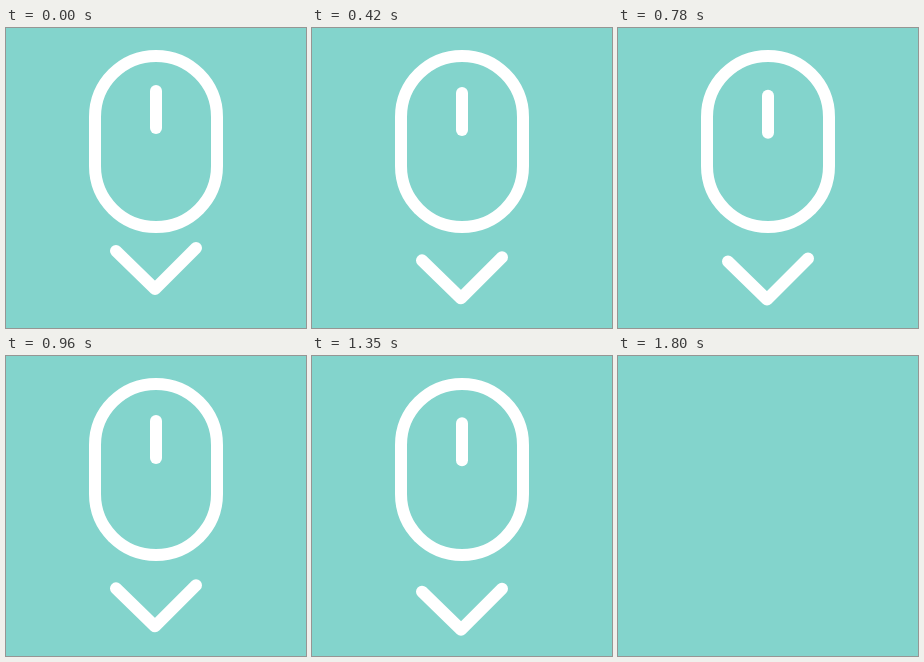
Write an HTML page that moves like this. It is 300 px wide and 300 px high and loops after 1.83 s.

```html
<!DOCTYPE html>
<html lang="en">
<head>
<meta charset="utf-8">
<title>Scroll hint</title>
<style>
  html, body { margin: 0; width: 100%; height: 100%; overflow: hidden; background: #83d4cc; }
  svg { display: block; width: 100%; height: 100%; }
</style>
</head>
<body>
<svg viewBox="0 0 300 300">
  <g id="icon" fill="none" stroke="#fff" stroke-width="12" stroke-linecap="round" stroke-linejoin="round">
    <rect x="89" y="28" width="122" height="171" rx="61"/>
    <path id="wheel" d="M150 63V100"/>
    <path id="arrow" d="M110 223L149 261L190 220"/>
  </g>
</svg>
<script>
  const LOOP = 1830, STEP = 30, CYCLE = 540, PEAK = 225, FADE_START = 1620, FADE_END = 1800;
  const [icon, wheel, arrow] = ["icon", "wheel", "arrow"].map(id => document.getElementById(id));

  // Eased push down, then a steady return; 0 before the first push.
  function bob(t) {
    if (t <= 0) return 0;
    const p = t % CYCLE;
    return p < PEAK
      ? (1 - Math.cos(Math.PI * p / PEAK)) / 2
      : (CYCLE - p) / (CYCLE - PEAK);
  }

  const shift = (el, y) => el.setAttribute("transform", `translate(0 ${y})`);

  function draw(now) {
    const t = Math.floor((now % LOOP) / STEP) * STEP;
    const move = Math.min(t, FADE_START);
    shift(wheel, 5 * bob(move));
    shift(arrow, 14 * bob(move - 90));
    const fade = (t - FADE_START) / (FADE_END - FADE_START);
    icon.setAttribute("opacity", 1 - Math.min(1, Math.max(0, fade)));
  }

  const start = performance.now();
  function tick() {
    draw(performance.now() - start);
    requestAnimationFrame(tick);
  }
  tick();
</script>
</body>
</html>
```
